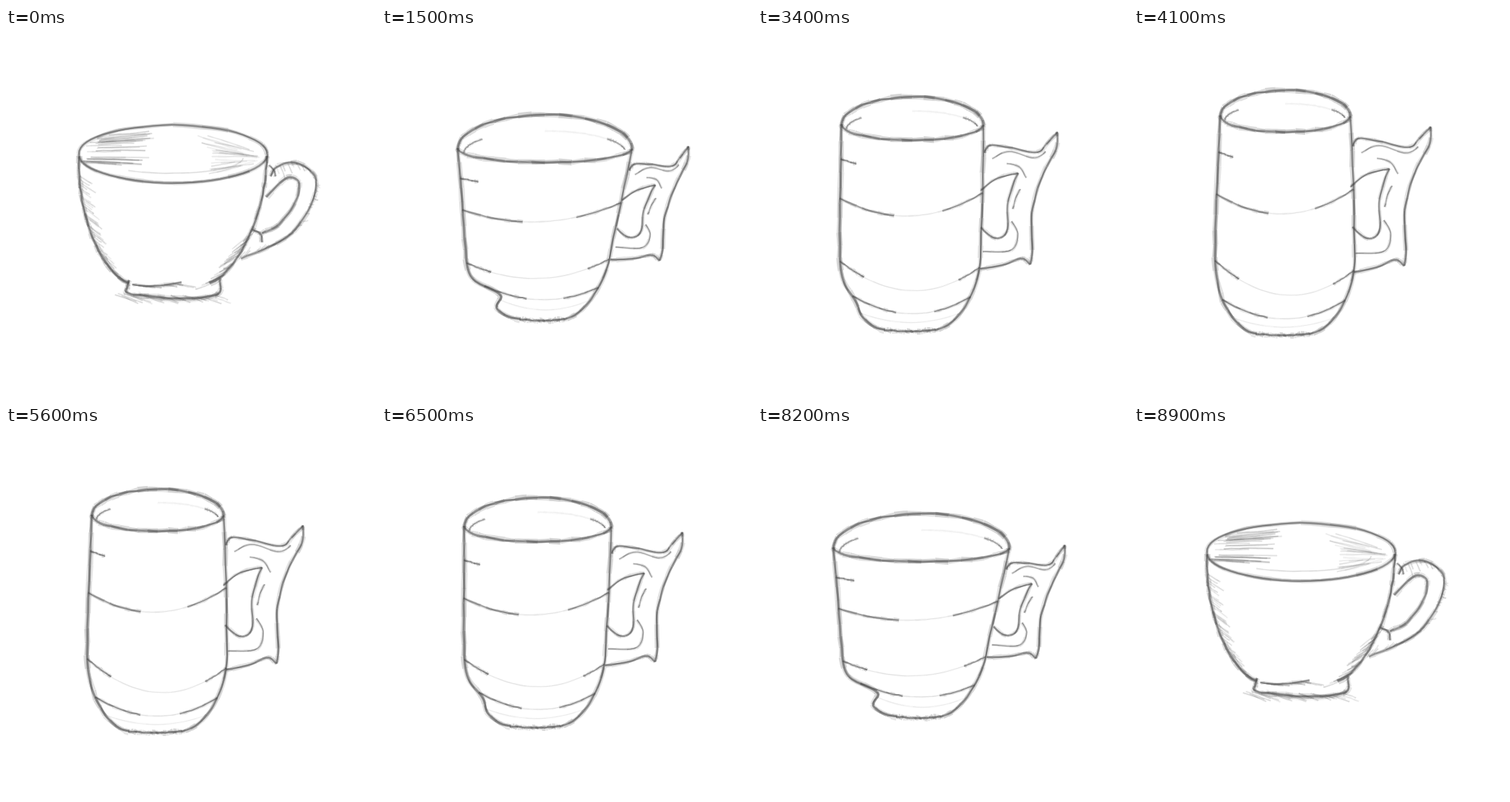
These frames come from a looping animation (512 px wide and 512 px high, 9600 ms). An HTML page with a canvas:

```html
<!DOCTYPE html>
<html lang="en">
<head>
<meta charset="utf-8">
<title>Cup and mug</title>
<style>
html, body { margin: 0; width: 100%; height: 100%; overflow: hidden; background: #fff; }
canvas { display: block; width: 100vmin; height: 100vmin; }
</style>
</head>
<body>
<canvas id="stage" width="512" height="512"></canvas>
<script>
const ctx = document.getElementById('stage').getContext('2d');
const STEP = 100, STEPS = 34, LOOP = 9600, GROW_AT = 800, SHRINK_AT = 5600;

let seed;
function random() {
  seed = (seed * 1664525 + 1013904223) >>> 0;
  return seed / 4294967296;
}
const spread = amount => (random() * 2 - 1) * amount;
const blend = (a, b, t) => a + (b - a) * t;

// Paths are lists of [x, y]
const trace = (point, from = 0, to = 1, n = 60) =>
  Array.from({ length: n + 1 }, (_, i) => point(blend(from, to, i / n)));

const ellipse = (cx, cy, rx, ry, from, to) =>
  trace(a => [cx + rx * Math.cos(a), cy + ry * Math.sin(a)], from, to);

// Catmull-Rom curve through a flat list of x, y values
function curve(p, detail = 9) {
  const last = p.length / 2 - 1;
  const at = (i, axis) => p[2 * Math.max(0, Math.min(last, i)) + axis];
  return trace(s => {
    const i = Math.min(last - 1, Math.floor(s)), t = s - i;
    return [0, 1].map(axis => {
      const [a, b, c, d] = [-1, 0, 1, 2].map(k => at(i + k, axis));
      return b + t / 2 * (c - a + t * (2 * a - 5 * b + 4 * c - d + t * (3 * (b - c) + d - a)));
    });
  }, 0, last, last * detail);
}

// One uneven pass of graphite along a path
function pass(path, width, alpha, jitter) {
  let dx = spread(jitter), dy = spread(jitter);
  for (let i = 0; i < path.length - 1; i += 3) {
    const end = Math.min(i + 3, path.length - 1);
    const nx = spread(jitter), ny = spread(jitter);
    ctx.beginPath();
    for (let j = i; j <= end; j++) {
      const t = (j - i) / (end - i);
      ctx.lineTo(path[j][0] + blend(dx, nx, t), path[j][1] + blend(dy, ny, t));
    }
    ctx.lineWidth = width * (0.75 + random() * 0.5);
    ctx.strokeStyle = `rgba(75,75,75,${alpha * (0.65 + random() * 0.6)})`;
    ctx.stroke();
    dx = nx;
    dy = ny;
  }
}

function pencil(path, width = 3, tone = 1) {
  pass(path, width * 1.9, 0.2 * tone, width * 0.3);
  for (let i = 0; i < 3; i++) pass(path, width * 0.75, 0.32 * tone, width * 0.27);
}

// Light strokes that start along a path while their direction turns
function hatch(path, count, slant, slantEnd, tone = 0.2, wobble = 3) {
  for (let i = 0; i < count; i++) {
    const t = i / (count - 1), [px, py] = path[Math.round(t * (path.length - 1))];
    const x = px + spread(wobble), y = py + spread(wobble / 2), size = 0.6 + random() * 0.5;
    const dx = blend(slant[0], slantEnd[0], t) * size, dy = blend(slant[1], slantEnd[1], t) * size;
    pencil(curve([x, y, x + dx / 2, y + dy / 2 + spread(1), x + dx, y + dy]), 1.7, tone * (0.6 + random() * 0.8));
  }
}

function drawCup() {
  const side = dir => v => [
    231 - 5 * v + dir * (56 + 74 * (1 - v * v) ** 0.68),
    178 + 175 * v
  ];
  const left = trace(side(-1)), right = trace(side(1));
  const outer = curve([366, 205, 376, 191, 403, 187, 428, 206, 424, 240, 398, 281, 362, 304, 325, 319]);
  const inner = curve([360, 234, 388, 208, 405, 214, 400, 242, 376, 273, 354, 284]);

  // shading
  hatch(curve([136, 150, 118, 168, 110, 190]), 26, [75, -8], [75, 5], 0.25, 10);
  hatch(curve([272, 149, 290, 175, 288, 203]), 22, [68, 24], [52, -15], 0.12, 9);
  hatch(trace(side(-1), 0.15, 0.95), 34, [20, 13], [16, 14], 0.17);
  hatch(trace(side(1), 0.6, 1), 22, [-20, 17], [-22, 8], 0.2);
  hatch(outer.slice(9), 34, [6, 17], [9, -13], 0.18);
  hatch(curve([153, 369, 288, 372]), 20, [35, 13], [20, 7], 0.17, 4);
  hatch(curve([185, 357, 240, 355]), 9, [20, 1], [24, 4], 0.25);
  pencil(ellipse(228, 180, 100, 21, 0, 2.2), 1.6, 0.2);
  pencil(ellipse(238, 363, 58, 13, 0.2, 2.8), 4, 0.25);

  // outlines
  pencil(ellipse(231, 174.5, 130.5, 40, 0, Math.PI * 2), 3.2, 0.95);
  pencil(left, 3.7);
  pencil(right, 3.5);
  pencil(curve([171, 349, 168, 359, 168, 367, 198, 371, 232, 374, 268, 373, 295, 367, 296, 347]), 3.5);
  pencil(curve([175, 355, 205, 357, 243, 352]), 2.8, 0.9);
  pencil(outer, 3.1, 0.95);
  pencil(inner, 3.8, 0.9);
  pencil(curve([364, 190, 371, 197, 373, 205]), 2.5, 0.8);
  pencil(curve([341, 279, 352, 285, 354, 296]), 3);
}

// u = 0 is a wide pose, u = 1 a tall one
function drawMug(u) {
  const mix = (wide, tall) => blend(wide, tall, u);
  const cx = mix(225.5, 210), cy = mix(167, 123.5), rx = mix(120.5, 91);
  const back = mix(47, 36), front = mix(19, 22), height = mix(236, 299);

  // Walls run straight, then round into the base; the left one has a foot that smooths away
  function wall(dir, v) {
    const t = Math.max(0, (v - 0.65) / 0.35);
    const corner = 1 - Math.max(0, 1 - t * t) ** 0.6;
    const bulge = mix(0, 3) * Math.sin(Math.PI * v);
    const notch = mix(28, 0) * Math.exp(-(((v - 0.855) / 0.06) ** 2));
    return dir < 0
      ? mix(105, 119) + mix(18, -6) * v - bulge + mix(68, 57) * corner + notch
      : mix(346, 301) + mix(-49, 3) * v + bulge - mix(45, 61) * corner;
  }
  const side = dir => trace(s => {
    const v = Math.sin(s * Math.PI / 2);
    return [wall(dir, v), cy + height * v];
  });

  // A hoop around the body: dark near both walls, faint between
  function band(yLeft, yRight, sag, darkLeft, darkRight, faint = 0.14) {
    const xLeft = wall(-1, (yLeft - cy) / height), xRight = wall(1, (yRight - cy) / height);
    const point = f => [blend(xLeft, xRight, f), blend(yLeft, yRight, f) + sag * 4 * f * (1 - f)];
    if (darkLeft) pencil(trace(point, 0, darkLeft, 30), 2.4, 0.85);
    if (faint) pencil(trace(point, darkLeft, darkRight, 30), 1.5, faint);
    if (darkRight < 1) pencil(trace(point, darkRight, 1, 30), 2.2, 0.8);
  }

  // rim
  pencil(ellipse(cx, cy, rx, back, Math.PI, Math.PI * 2), 4, 0.95);
  pencil(ellipse(cx, cy, rx, front, 0, Math.PI), 3.7);
  const lip = (from, to, tone) =>
    pencil(ellipse(cx, cy + 6, rx * 0.93, back * 0.65, Math.PI * from, Math.PI * to), 2.3, tone);
  lip(1, 1.22, 0.6);
  lip(1.5, 1.78, 0.07);
  lip(1.78, 1.95, 0.6);

  // body
  const left = side(-1), right = side(1);
  pencil(left, 3.8);
  pencil(right, 3.2);
  pencil(trace(f => [
    blend(left[60][0], right[60][0], f),
    cy + height + 2 * Math.sin(Math.PI * f)
  ]), 3.5);
  band(mix(208, 173), mix(208, 173), mix(12, 18), 0.11, 1, 0);
  band(mix(252, 231), mix(242, 224), mix(21, 30), 0.38, 0.72);
  band(mix(325, 322), mix(320, 335), mix(24, 40), 0.17, 0.85);
  band(mix(357, 375), mix(359, 376), mix(18, 26), 0.37, 0.69);
  band(mix(376, 400), mix(376, 400), mix(14, 13), 0, 1, 0.1);

  // The handle's box is pulled by its corners as the mug grows
  const pull = ([x, y]) => {
    const s = (x - 316) / 108, t = (y - 164) / 158;
    const shift = (tl, tr, bl, br) => u * blend(blend(tl, tr, s), blend(bl, br, s), t);
    return [x + shift(-55, -13, -11, -9), y + shift(-50, -26, 17, 1)];
  };
  const handle = (points, width, tone) => pencil(curve(points).map(pull), width, tone);
  handle([342, 197, 350, 188, 374, 189, 401, 191, 412, 180, 424, 164], 2.7, 0.95);
  handle([424, 164, 422, 186, 405, 220, 391, 262, 388, 305, 384, 322], 3, 0.95);
  handle([384, 322, 373, 314, 349, 319, 316, 321], 3, 0.95);
  handle([332, 238, 354, 224, 378, 217], 2.5, 0.95);
  handle([378, 217, 363, 250, 358, 282, 342, 290, 325, 278], 2.8, 0.9);
  handle([350, 203, 370, 193, 397, 198, 411, 189], 2, 0.6);
  handle([366, 207, 380, 210, 387, 222], 2, 0.6);
  handle([379, 235, 373, 245, 368, 258], 2, 0.7);
  handle([365, 272, 371, 287, 360, 304, 323, 303], 2, 0.7);
}

function stepAt(time) {
  const stepsSince = start =>
    Math.max(0, Math.min(STEPS, Math.floor((time - start) / STEP) + 1));
  return stepsSince(GROW_AT) - stepsSince(SHRINK_AT);
}

let shown = -1;
function render(now) {
  const step = stepAt(now % LOOP);
  if (step !== shown) {
    shown = step;
    seed = 7;
    ctx.fillStyle = '#fff';
    ctx.fillRect(0, 0, 512, 512);
    if (step === 0) drawCup();
    else drawMug((step - 8) / 25);
  }
  requestAnimationFrame(render);
}
ctx.lineJoin = 'round';
render(performance.now());
</script>
</body>
</html>
```
